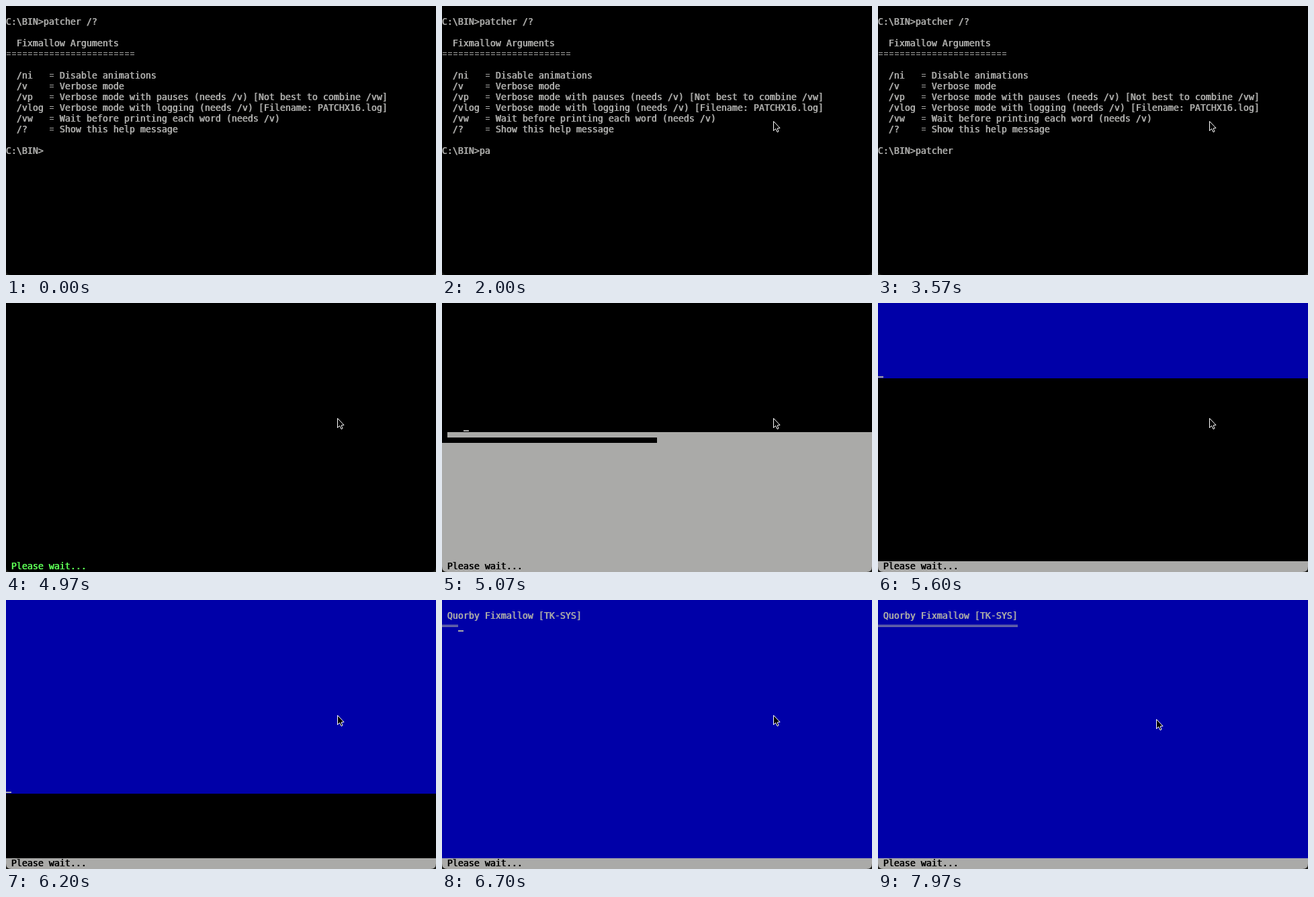
An HTML page with a canvas that plays this animation: 640 by 400 pixels, repeating every 8 s.

```html
<!DOCTYPE html>
<html lang="en">
<head>
<meta charset="utf-8">
<title>Patcher</title>
<style>
  html, body { margin: 0; width: 100%; height: 100%; overflow: hidden; background: #000; }
  canvas { display: block; width: 640px; height: 400px; }
</style>
</head>
<body>
<canvas id="screen" width="640" height="400"></canvas>
<script>
const ctx = document.getElementById('screen').getContext('2d');
const LOOP = 8000, W = 640, H = 400, CW = 8, RH = 16;
const GRAY = '#aaaaa8', BLUE = '#0000a8', GREEN = '#5cff55', BLACK = '#000', EDGE = '#1c1c18';
const TICK = 54.9;      // one PC timer tick
const BLINK = 136;

const HELP = [
  '',
  'C:\\BIN>patcher /?',
  '',
  '  Fixmallow Arguments',
  '='.repeat(24),
  '',
  '  /ni   = Disable animations',
  '  /v    = Verbose mode',
  '  /vp   = Verbose mode with pauses (needs /v) [Not best to combine /vw]',
  '  /vlog = Verbose mode with logging (needs /v) [Filename: PATCHX16.log]',
  '  /vw   = Wait before printing each word (needs /v)',
  '  /?    = Show this help message'
];
const PROMPT = 'C:\\BIN>', COMMAND = 'patcher /v';
const TITLE = 'Quorby Fixmallow [TK-SYS]', WAIT = 'Please wait...';

const T = {
  type: 1600, key: 275, enter: 4420, clear: 4520, wait: 4720,
  gray: 4985, black: 5020, blue: 5207, title: 6580
};

const clamp = (v, lo, hi) => Math.max(lo, Math.min(hi, v));
const span = (t, a, b) => clamp((t - a) / (b - a), 0, 1);
const smooth = u => u * u * (3 - 2 * u);
const mix = (a, b, u) => a + (b - a) * u;

function rect(color, x, y, w, h) {
  ctx.fillStyle = color;
  ctx.fillRect(x, y, w, h);
}

// Double-struck glyphs on the 8x16 text grid
function print(str, col, row, color) {
  const y = row * RH;
  ctx.font = '13.29px "DejaVu Sans Mono", monospace';
  ctx.textBaseline = 'alphabetic';
  ctx.fillStyle = color;
  [...str].forEach((ch, i) => {
    const x = (col + i) * CW;
    if (ch === '=') {
      ctx.fillRect(x + 1, y + 5, 6, 1);
      ctx.fillRect(x + 1, y + 8, 6, 1);
    } else if (ch !== ' ') {
      ctx.fillText(ch, x - 0.6, y + 12);
      ctx.fillText(ch, x + 0.2, y + 12);
    }
  });
}

function caret(t, col, row) {
  if (Math.floor((t - 20) / BLINK) % 2 === 1) rect(GRAY, col * CW, row * RH + 13, CW, 2);
}

function shell(t) {
  HELP.forEach((line, row) => print(line, 0, row, GRAY));
  let n = clamp(Math.floor((t - T.type) / T.key) + 1, 0, 8);
  n += (t >= 4080) + (t >= 4240);
  const line = PROMPT + COMMAND.slice(0, n);
  print(line, 0, 13, GRAY);
  if (t < T.enter) caret(t, line.length, 13);
  else caret(t, 0, 14);
}

function grayFill(t) {
  const rows = Math.floor(25 * span(t, T.gray, T.black));
  rect(GRAY, 0, 0, W, rows * RH);
  print(WAIT, 1, 24, rows > 24 ? BLACK : GREEN);
}

// The wipe advances half a text row at a time
function blackWipe(t) {
  const halves = Math.min(48, Math.floor((t - T.black) / 2));
  const row = halves >> 1, y = row * RH;
  rect(GRAY, 0, 0, W, H);
  rect(BLACK, 0, 0, W, y);
  if (halves % 2) {
    rect(BLACK, 0, y, CW, 8);
    rect(BLACK, 0, y + 8, W / 2, 8);
  }
  print(WAIT, 1, 24, BLACK);
  if (row) caret(t, row < 24 ? 4 : 0, row < 24 ? row - 1 : 0);
}

function blueScreen(t) {
  const rows = clamp(Math.floor((t - T.blue) / TICK), 0, 24);
  rect(GRAY, 0, 24 * RH, W, RH);
  rect(BLUE, 0, 0, W, rows * RH);
  print(WAIT, 1, 24, BLACK);
  if (t < T.title) {
    caret(t, 0, Math.max(0, rows - 1));
    return;
  }
  const cols = clamp(Math.floor((t - T.title) / TICK) + 1, 0, 26);
  print(TITLE, 1, 1, GRAY);
  rect(GRAY, 0, 37, cols * CW, 1);
  rect(GRAY, 0, 39, cols * CW, 1);
  caret(t, cols, 2);
}

function corners() {
  const r = 8;
  ctx.fillStyle = EDGE;
  ctx.beginPath();
  ctx.moveTo(0, H - r);
  ctx.quadraticCurveTo(0, H, r, H);
  ctx.lineTo(0, H);
  ctx.moveTo(W, H - r);
  ctx.quadraticCurveTo(W, H, W - r, H);
  ctx.lineTo(W, H);
  ctx.fill();
}

function pointer(t) {
  if (t < 400) return;
  const enter = 1 - (1 - span(t, 400, 1090)) ** 2;
  let x = mix(590, 493, enter), y = mix(192, 171, enter);
  const dip = smooth(span(t, 7460, 7600)), away = smooth(span(t, 7600, 7970));
  x += 6 * dip - 85 * away;
  y += 8 * dip - 2 * away;
  ctx.save();
  ctx.translate(Math.round(x) + 0.5, Math.round(y) + 0.5);
  ctx.beginPath();
  [[0, 0], [0, 14], [3, 11], [5.5, 16], [7.5, 15], [5.5, 10.5], [9.5, 10]]
    .forEach(p => ctx.lineTo(...p));
  ctx.closePath();
  ctx.fillStyle = BLACK;
  ctx.strokeStyle = '#fff';
  ctx.lineWidth = 1;
  ctx.fill();
  ctx.stroke();
  ctx.restore();
}

function draw(t) {
  rect(BLACK, 0, 0, W, H);
  if (t < T.clear) shell(t);
  else if (t < T.gray) {
    if (t >= T.wait) print(WAIT, 1, 24, GREEN);
    caret(t, 0, 0);
  }
  else if (t < T.black) grayFill(t);
  else if (t < T.blue) blackWipe(t);
  else blueScreen(t);
  corners();
  pointer(t);
}

const start = performance.now();
function frame() {
  draw((performance.now() - start) % LOOP);
  requestAnimationFrame(frame);
}
frame();
</script>
</body>
</html>
```
